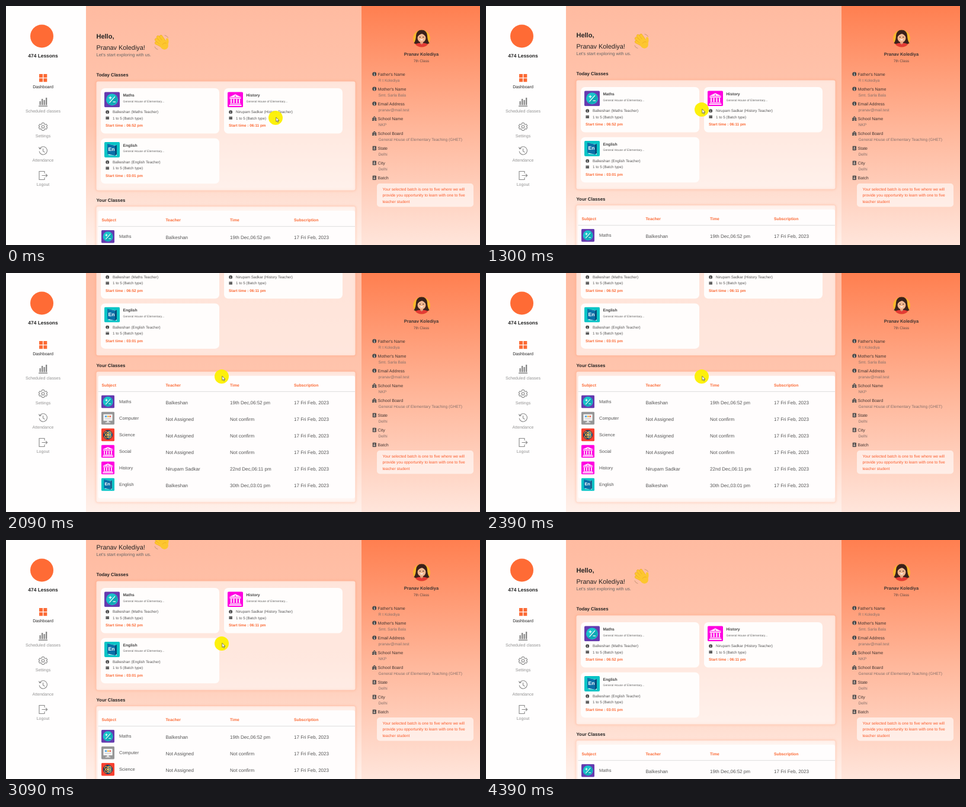
Recreate the animation shown at these times as an HTML page. Size 800 by 404 pixels, loop 5090 ms.

```html
<!DOCTYPE html>
<html lang="en">
<head>
<meta charset="utf-8">
<title>Student dashboard</title>
<style>
html, body { margin: 0; width: 100%; height: 100%; overflow: hidden; background: #fff; }
svg.stage { display: block; width: 100vw; height: 100vh; }
text { font-family: "Liberation Sans", Arial, sans-serif; text-rendering: geometricPrecision; white-space: pre; }
</style>
</head>
<body>
<svg class="stage" viewBox="0 0 800 404">
  <defs>
    <linearGradient id="mainBg" x2="0" y2="1">
      <stop stop-color="#ffbba1"/><stop offset=".5" stop-color="#ffc6af"/><stop offset="1" stop-color="#fff0ea"/>
    </linearGradient>
    <linearGradient id="sideBg" x2="0" y2="1">
      <stop stop-color="#ff7f50"/><stop offset=".5" stop-color="#ffb598"/><stop offset="1" stop-color="#ffe5db"/>
    </linearGradient>
    <filter id="blur"><feGaussianBlur stdDeviation="1.8"/></filter>
    <clipPath id="mainClip"><path d="M135 0H600V404H135z"/></clipPath>

    <symbol id="Maths" viewBox="0 0 26 26">
      <rect width="26" height="26" rx="2" fill="#653bb0"/>
      <circle cx="13" cy="13" r="10" fill="#18c3c9"/>
      <path d="M6 20L20 6A10 10 0 0 1 6 20z" fill="#0fa9b5"/>
      <path d="M7.500 10h5M10 7.500v5M8.500 18.500L18 8M14.500 17h4.500" stroke="#fff" stroke-width="1.200" fill="none"/>
    </symbol>
    <symbol id="History" viewBox="0 0 26 26">
      <rect width="26" height="26" rx="2" fill="#ff00e1"/>
      <path d="M13 4L23.500 9H2.500zM3.500 9.800h19v1.700h-19zM4 19.500h18V21H4zM2.500 21.700h21v2h-21z" fill="#ffe9fb"/>
      <path d="M6 12v7M10.600 12v7M15.400 12v7M20 12v7" stroke="#ffe9fb" stroke-width="2.200"/>
      <circle cx="13" cy="7.200" r="1" fill="#ff00e1"/>
    </symbol>
    <symbol id="English" viewBox="0 0 26 26">
      <rect width="26" height="26" rx="2" fill="#08c4c6"/>
      <path d="M7 4l14 2v17l-14-1z" fill="#eaf6fb"/>
      <path d="M5 3l13 3v17L5 20z" fill="#0b6fa8"/>
      <path d="M18 6l3-1v16l-3 2z" fill="#084f7d"/>
      <text x="6.500" y="15" font-size="8.500" font-weight="bold" fill="#fff">En</text>
    </symbol>
    <symbol id="Computer" viewBox="0 0 26 26">
      <rect width="26" height="26" rx="2" fill="#979797"/>
      <rect x="4" y="5" width="18" height="13" rx="1" fill="#f4f4f4"/>
      <path d="M11 18h4v3h3v1.500H8V21h3z" fill="#e4e4e4"/>
      <path d="M7 8h4v3H7z" fill="#4ba3e3"/><path d="M12 8h3v3h-3z" fill="#f5b92e"/><path d="M16 8h3v3h-3z" fill="#ef5b4c"/>
      <path d="M7 14h12" stroke="#bbb"/>
    </symbol>
    <symbol id="Science" viewBox="0 0 26 26">
      <rect width="26" height="26" rx="2" fill="#f8402f"/>
      <circle cx="13" cy="13" r="9.500" fill="#17345c"/>
      <path d="M13 5a8 8 0 0 1 0 16z" fill="#2d7fa8"/>
      <g fill="none" stroke="#f5a63a" stroke-width="1.300">
        <ellipse cx="13" cy="13" rx="8" ry="3.500" transform="rotate(45 13 13)"/>
        <ellipse cx="13" cy="13" rx="8" ry="3.500" transform="rotate(-45 13 13)"/>
      </g>
      <circle cx="13" cy="13" r="2" fill="#ffd45a"/>
    </symbol>

    <symbol id="info" viewBox="0 0 8 8">
      <circle cx="4" cy="4" r="3.700" fill="#444"/>
      <path d="M4 1.600v1.100M3.200 3.600H4v2.400M3 6h2" stroke="#fff" stroke-width=".8" fill="none"/>
    </symbol>
    <symbol id="batch" viewBox="0 0 8 8">
      <path d="M.5 1h7v1.500h-7zM.5 3h7v4h-7z" fill="#555"/>
    </symbol>
    <symbol id="school" viewBox="0 0 8 8">
      <path d="M4 0L6 1.800V3h2v5H0V3h2V1.800z" fill="#444"/>
      <path d="M3.400 8V5.500h1.200V8M1 4.300v2M7 4.300v2" stroke="#ffd5c4" stroke-width=".7" fill="none"/>
      <circle cx="4" cy="3" r=".9" fill="#ffd5c4"/>
    </symbol>
    <symbol id="book" viewBox="0 0 8 8">
      <path d="M.8 0h6v8h-6zM7 1h.8v1.500H7zM7 3.300h.8v1.500H7zM7 5.600h.8v1.500H7z" fill="#444"/>
      <circle cx="3.800" cy="2.800" r="1.100" fill="#ffe0d4"/><path d="M1.900 6.200a1.900 1.700 0 0 1 3.800 0z" fill="#ffe0d4"/>
    </symbol>
  </defs>

  <rect width="136" height="404" fill="#fffefe"/>
  <rect x="135" width="465" height="404" fill="url(#mainBg)"/>
  <rect x="600" width="200" height="404" fill="url(#sideBg)"/>
  <g id="nav"></g>
  <g clip-path="url(#mainClip)"><g id="page"></g></g>
  <g id="profile"></g>
  <g id="cursor">
    <circle r="12" fill="#fdf000" opacity=".95"/>
    <path d="M.8-.8v7.200l1.700-1.500 1.100 2.600 1.200-.5-1.100-2.500h2.200z" fill="#fff" stroke="#333" stroke-width=".6"/>
  </g>
</svg>

<script>
const ORANGE = '#fb6a35';
const STUDENT = 'Pranav Kolediya';
const TUTOR = 'Balkeshan';
const TUTOR_2 = 'Nirupam Sadkar';
const BOARD = 'General House of Elementary';

const $ = id => document.getElementById(id);
const text = (x, y, size, fill, content, extra = '') =>
  `<text x="${x}" y="${y}" font-size="${size}" fill="${fill}" ${extra}>${content}</text>`;
const bold = (x, y, size, fill, content, extra = '') =>
  text(x, y, size, fill, content, 'font-weight="bold" ' + extra);
const icon = (id, x, y, size) =>
  `<use href="#${id}" x="${x}" y="${y}" width="${size}" height="${size}"/>`;
const MIDDLE = 'text-anchor="middle"';

function drawNav() {
  const line = d => `<path d="${d}" fill="none" stroke="#888" stroke-width="1.1"/>`;
  const items = [
    ['Dashboard', 139, `<path d="M56 115h6v6h-6zM63.300 115h6v6h-6zM56 122.300h6v6h-6zM63.300 122.300h6v6h-6z" fill="${ORANGE}"/>`],
    ['Scheduled classes', 180, '<path d="M55 168.500h15v1.500H55zM56.500 161h2.300v6.500h-2.300zM60 157h2.300v10.500H60zM63.500 159h2.300v8.500h-2.300zM67 155h2.300v12.500H67z" fill="#888"/>'],
    ['Settings', 221.5, line('M61 197.500h3l.6 2 1.600.9 2-.6 1.500 2.600-1.500 1.600 1.500 1.600-1.500 2.600-2-.6-1.600.9-.6 2h-3l-.6-2-1.600-.9-2 .6-1.500-2.600 1.500-1.600-1.500-1.600 1.500-2.600 2 .6 1.600-.9z') +
      '<circle cx="62.500" cy="204" r="2.300" fill="none" stroke="#888" stroke-width="1.100"/>'],
    ['Attendance', 263, line('M57 241a6.700 6.700 0 1 1-.9 4.500M55.500 238.500l1.300 3 3-.7M62.500 241v4.500l3 1.800')],
    ['Logout', 304, line('M65 283v-3.500h-9v14h9V290M60.500 286.500h9M67 283.800l2.700 2.700-2.700 2.700')],
  ];
  $('nav').innerHTML =
    `<circle cx="60.500" cy="51" r="19.500" fill="#ff6b35"/>` +
    bold(62.5, 87.3, 8.4, '#222', '474 Lessons', MIDDLE) +
    items.map(([label, y, art], i) => art + text(62.5, y, 7.1, i ? '#929292' : '#222', label, MIDDLE)).join('');
}

function wavingHand() {
  const fingers = ['M264 68L253.500 62.500', 'M265 66L253.500 57', 'M267 64L256.500 52.500', 'M269 62L261.500 51.500'];
  const stroke = (d, color, width) =>
    `<path d="${d}" fill="none" stroke="${color}" stroke-width="${width}" stroke-linecap="round"/>`;
  return fingers.map(d => stroke(d, '#e9a21f', 5) + stroke(d, '#fdc62f', 4.2)).join('') +
    '<ellipse cx="266.500" cy="65.500" rx="7" ry="8.500" transform="rotate(-30 266.500 65.500)" fill="#fdc62f"/>' +
    stroke('M271 65Q273.500 61 272 56.500', '#fdc62f', 4) +
    stroke('M264 65Q268 61 270.500 63', '#e9a21f', .7) +
    stroke('M268 49.500Q272 50.500 273.500 53.500M251 69Q252 72.500 256 73.500', '#b98a6c', .8);
}

function panel(y, height) {
  const box = `x="152.500" y="${y}" width="437" height="${height}" rx="3"`;
  return `<rect ${box} fill="none" stroke="#ff8558" stroke-opacity=".2" stroke-width="4" filter="url(#blur)"/>
    <rect ${box} fill="#fff" fill-opacity=".6"/>`;
}

function classCard(x, y, subject, teacher, time) {
  return `<rect x="${x}" y="${y}" width="200" height="76.500" rx="7" fill="#fffdfc"/>` +
    icon(subject, x + 6, y + 6.2, 26) +
    bold(x + 37.5, y + 14, 6.7, '#444', subject) +
    text(x + 37.5, y + 23.5, 5, '#666', BOARD + '...') +
    icon('info', x + 8, y + 37, 6.4) +
    text(x + 20, y + 42.3, 6.35, '#555', `${teacher} (${subject} Teacher)`) +
    icon('batch', x + 8, y + 47.2, 6.4) +
    text(x + 20, y + 52.7, 6.25, '#555', '1 to 5 (Batch type)') +
    bold(x + 8, y + 65.2, 6.4, ORANGE, `Start time : ${time} pm`);
}

function drawPage() {
  const columns = [161.5, 269.5, 378, 486];
  const rows = [
    ['Maths', TUTOR, '19th Dec,06:52 pm'],
    ['Computer'], ['Science'], ['Social'],
    ['History', TUTOR_2, '22nd Dec,06:11 pm'],
    ['English', TUTOR, '30th Dec,03:01 pm'],
  ];
  const headers = ['Subject', 'Teacher', 'Time', 'Subscription'];
  $('page').innerHTML =
    bold(152.5, 55, 11, '#222', 'Hello,') +
    text(152.5, 74, 10.9, '#222', STUDENT + '!') +
    text(152.5, 85.3, 7.5, '#666', "Let's start exploring with us.") +
    wavingHand() +
    bold(152.5, 119, 7.8, '#222', 'Today Classes') +
    panel(127.5, 184) +
    classCard(160, 139, 'Maths', TUTOR, '06:52') +
    classCard(368, 139, 'History', TUTOR_2, '06:11') +
    classCard(160, 223.7, 'English', TUTOR, '03:01') +
    bold(152.5, 331, 7.8, '#222', 'Your Classes') +
    panel(339, 220.5) +
    '<rect x="155.500" y="346" width="433.500" height="207" rx="3" fill="#fffdfd"/>' +
    headers.map((label, i) => bold(columns[i], 364.3, 6.75, ORANGE, label)).join('') +
    '<path d="M155.500 372.700H589" stroke="#ddd"/>' +
    rows.map(([subject, teacher = 'Not Assigned', time = 'Not confirm'], i) => {
      const y = 378.8 + 28 * i;
      return icon(subject === 'Social' ? 'History' : subject, 161, y, 22) +
        text(191, y + 13.4, 7.5, '#555', subject) +
        [teacher, time, '17 Fri Feb, 2023']
          .map((value, c) => text(columns[c + 1], y + 15.4, 8.05, '#555', value)).join('');
    }).join('');
}

function drawProfile() {
  const fields = [
    ['info', "Father's Name", 'R t Kolediya'],
    ['info', "Mother's Name", 'Smt. Sarla Bala'],
    ['info', 'Email Address', 'pranav@mail.test'],
    ['school', 'School Name', 'NKP'],
    ['school', 'School Board', BOARD + ' Teaching (GHET)'],
    ['book', 'State', 'Delhi'],
    ['book', 'City', 'Delhi'],
    ['book', 'Batch', ''],
  ];
  const note = ['Your selected batch is one to five where we will',
    'provide you opportunity to learn with one to five', 'teacher student'];
  const avatar = `<circle cx="701.500" cy="55" r="14.500" fill="#f9b62c"/>
    <path d="M688.500 63Q692 57 692 50Q693 40.500 701.500 40.500Q710 40.500 711 50Q711 57 714.500 63Q708 66 701.500 65Q695 66 688.500 63z" fill="#3a211c"/>
    <path d="M690.500 64.500Q701.500 60 712.500 64.500A14.500 14.500 0 0 1 690.500 64.500z" fill="#e33b35"/>
    <path d="M699 59h5v4l-2.500 2-2.500-2z" fill="#dd9a74"/>
    <ellipse cx="701.500" cy="54" rx="7" ry="7.500" fill="#f3b992"/>
    <path d="M694 53Q695 46 702 45Q708.500 46 709 53Q706 48 702 47Q697 48 694 53z" fill="#3a211c"/>
    <path d="M697.500 52.700h2.500M703 52.700h2.500" stroke="#3a211c"/><path d="M698.500 56.500q3 3 6 0z" fill="#fff"/>`;
  $('profile').innerHTML = avatar +
    bold(701, 84.3, 7.5, '#3c3432', STUDENT, MIDDLE) +
    text(701, 95, 6.4, '#5f4a43', '7th Class', MIDDLE) +
    fields.map(([art, label, value], i) => {
      const y = 115 + 25.05 * i;
      return icon(art, 618, y - 3.8, 7.6) +
        text(627.5, y + 2.7, 7.1, '#40332f', label) +
        text(628.5, y + 13, 6.7, '#85706a', value);
    }).join('') +
    '<rect x="626" y="300" width="163" height="39.500" rx="5" fill="#fff" fill-opacity=".6"/>' +
    note.map((row, i) => text(635.5, 312 + 10.3 * i, 6.65, '#fa5a28', row)).join('');
}

// Each pose holds until the next one: [start ms, value...]
const LOOP = 5090;
const scrollSteps = [[0, 0],
  [1300, 2], [1390, 28], [1500, 60], [1600, 79], [1700, 83.5],
  [1910, 87], [2000, 130], [2090, 172.3],
  [2520, 170], [2610, 131], [2700, 98], [2790, 89],
  [3000, 86], [3090, 58], [3210, 30], [3300, 12], [3410, 3], [3520, 0]];
const cursorSteps = [[0, 455, 189],
  [300, 449, 187], [400, 410, 176], [490, 370, 168], [600, 353, 167], [700, 364, 175],
  [4090, 365, 180], [4190, 375, 250], [4290, 400, 391], [4390, 400, 440]];
const poseAt = (steps, t) => steps.findLast(step => step[0] <= t);

function render(now) {
  const t = now % LOOP;
  const [, scroll] = poseAt(scrollSteps, t);
  const [, x, y] = poseAt(cursorSteps, t);
  $('page').setAttribute('transform', `translate(0 ${-scroll})`);
  $('cursor').setAttribute('transform', `translate(${x} ${y})`);
  requestAnimationFrame(render);
}

drawNav();
drawPage();
drawProfile();
render(performance.now());
</script>
</body>
</html>
```
